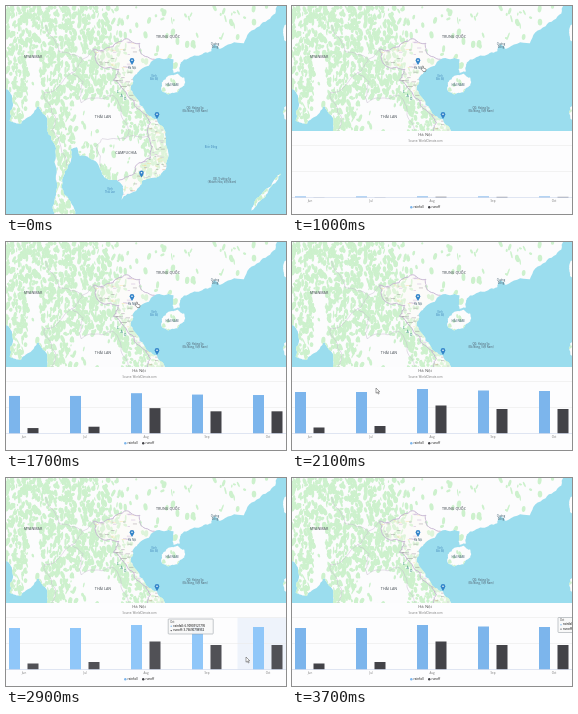
An HTML page with a canvas that plays this animation: 280x208 px, repeating every 3800 ms.

```html
<!DOCTYPE html>
<html lang="vi">
<head>
<meta charset="utf-8">
<title>Rainfall map</title>
<style>
html, body { margin: 0; width: 100%; height: 100%; overflow: hidden; background: #fff; }
canvas { display: block; width: 280px; height: 208px; }
</style>
</head>
<body>
<canvas id="stage"></canvas>
<script>
const W = 280, H = 208, LOOP = 3800;
const dpr = window.devicePixelRatio || 1;
const SANS = '"Open Sans", "Noto Sans", sans-serif';

function prepare(canvas) {
  canvas.width = W * dpr;
  canvas.height = H * dpr;
  const g = canvas.getContext('2d');
  g.scale(dpr, dpr);
  return g;
}

let seed = 7;
const rnd = () => (seed = (seed * 16807) % 2147483647) / 2147483647;
const clamp = v => Math.min(1, Math.max(0, v));

// Mercator projection with Hà Nội as the anchor.
const mercator = lat => Math.log(Math.tan(Math.PI / 4 + lat * Math.PI / 360));
const project = (lon, lat) =>
  [126 + 10.5 * (lon - 105.85), 58.5 + 601.6 * (mercator(21.03) - mercator(lat))];

// Repeated midpoint displacement turns a few points into a natural line.
function rough(list, amount = .3, depth = 3) {
  if (!depth) return list;
  const out = [list[0]];
  for (let i = 1; i < list.length; i++) {
    const [ax, ay] = list[i - 1], [bx, by] = list[i];
    const k = (rnd() - .5) * amount;
    out.push([(ax + bx) / 2 + (by - ay) * k, (ay + by) / 2 - (bx - ax) * k], list[i]);
  }
  return rough(out, amount, depth - 1);
}

const line = s => rough(s.split(' ').map(p => project(...p.split(',').map(Number))));

function trace(list) {
  const path = new Path2D();
  list.forEach(p => path.lineTo(...p));
  return path;
}

function island(x, y, rx, ry, turn = 0) {
  const ring = Array.from({ length: 9 }, (_, i) => {
    const a = i * Math.PI / 4, u = rx * Math.cos(a), v = ry * Math.sin(a);
    return [x + u * Math.cos(turn) - v * Math.sin(turn), y + u * Math.sin(turn) + v * Math.cos(turn)];
  });
  return trace(rough(ring));
}

function text(g, str, x, y, size, color = '#555', weight = 400, align = 'center') {
  g.font = `${weight} ${size}px ${SANS}`;
  g.fillStyle = color;
  g.textAlign = align;
  g.textBaseline = 'middle';
  g.fillText(str, x, y);
}

function dot(g, x, y, r, color) {
  g.beginPath();
  g.arc(x, y, r, 0, 7);
  g.fillStyle = color;
  g.fill();
}

// Coasts and borders as longitude,latitude.
const westCoast = line('93,19.5 94,18.8 94.5,17.6 94.2,16 95.3,15.7 96.3,16.5 96.9,17.3 97.6,16.4 97.8,15 98.6,12.8 98.7,10.2 98.3,8 98.5,6.5 100.6,6.5 100,8.4 99.3,9.3 99.2,10.5 99.9,12 100,13.3 100.6,13.5 100.9,12.7 102.2,12.3 103,11 103.6,10.5 104.5,10.4');
const vietCoast = line('104.5,10.4 105,9.9 104.8,8.6 106.2,9.4 106.8,10.4 108,10.7 109,11.4 109.3,13 108.9,15.2 108.2,16.1 107,17 105.7,18.8 105.9,19.8 106.7,20.6 108,21.5');
const eastCoast = line('108,21.5 109.8,21.5 109.8,20.3 110.4,20.4 110.5,21.2 112,21.8 113.4,22.2 113.6,22.8 114.2,22.4 116.5,22.9 118,24.4 119.5,25.5 120,27');
const vietBorder = line('108,21.5 106.7,22 106.6,22.9 105.3,23.3 104,22.6 102.2,22.4 103,20.8 104.6,20.6 104.1,19.6 105.1,18.7 106.5,17 107.6,15.8 107.4,14.5 107.6,12.5 106.2,11.8 106,11 104.5,10.4');
const borders = [
  '100.1,20.3 101.2,19.5 101,17.6 102.2,18 104,18.3 104.8,16.5 105.6,15 105.2,14.3 103,14.3 102.4,13.6 102.9,11.7',
  '97.6,24.5 98.9,22.2 101.1,21.5 100.1,20.3 97.5,18.5 98.6,16.2 98.2,15.1 99.6,11.8',
  '105.2,14.3 107.4,14.5',
  '101.1,21.5 102.2,22.4'
].map(line);

const inside = (x, y, cx, cy, rx, ry) => ((x - cx) / rx) ** 2 + ((y - cy) / ry) ** 2 < 1;

// Chance of forest: dense in the west, thin in the north-east, rare on the plains.
function forest(x, y) {
  const plain = inside(x, y, 90, 115, 27, 24) || inside(x, y, 116, 150, 23, 17) ||
    inside(x, y, 28, 82, 7, 36) || inside(x, y, 122, 184, 18, 14);
  if (plain) return .05;
  return y > 85 ? .8 : .1 + .75 * clamp((135 - x - (70 - y) * .3) / 45);
}

function pin(g, x, y) {
  g.beginPath();
  g.moveTo(x, y + 4);
  g.quadraticCurveTo(x - 2.3, y + 1, x - 2.3, y - .8);
  g.arc(x, y - .8, 2.3, Math.PI, 0);
  g.quadraticCurveTo(x + 2.3, y + 1, x, y + 4);
  g.fillStyle = '#3384c9';
  g.fill();
  dot(g, x, y - .8, .8, '#fff');
}

function drawMap(g) {
  g.fillStyle = '#9bddee';
  g.fillRect(0, 0, W, H);
  const land = trace([[-9, -9], ...westCoast, ...vietCoast, ...eastCoast]);
  land.addPath(island(167, 78, 13, 9.5, -.5));
  land.addPath(island(260, 186, 24, 2, -.89));
  land.addPath(island(281, 27, 4, 10));
  land.addPath(island(281, 107, 4, 8));
  g.fillStyle = '#fcfcfd';
  g.fill(land);

  g.save();
  g.clip(land);
  g.fillStyle = '#cdf1cd';
  for (let i = 0; i < 6000; i++) {
    const x = rnd() * W, y = rnd() * H;
    if (rnd() > forest(x, y)) continue;
    g.beginPath();
    g.ellipse(x, y, .6 + rnd() * 1.8, 1 + rnd() * 3, rnd() - .5, 0, 7);
    g.fill();
  }
  g.restore();

  g.lineWidth = .5;
  g.strokeStyle = '#c6bccf';
  borders.forEach(b => g.stroke(trace(b)));

  // Small town names and province lines.
  g.save();
  g.clip(trace([...vietCoast, ...vietBorder]));
  g.fillStyle = 'rgba(252,248,240,.35)';
  g.fillRect(85, 30, 85, 170);
  for (let i = 0; i < 420; i++) {
    g.fillStyle = ['rgba(110,100,110,.4)', 'rgba(190,160,205,.5)', 'rgba(248,220,150,.5)'][i % 3];
    g.fillRect(85 + rnd() * 80, 34 + rnd() * 160, 1.5 + rnd() * 3, .8);
  }
  g.restore();
  g.lineWidth = .9;
  g.strokeStyle = '#c4b3d2';
  g.stroke(trace(vietBorder));

  const label = (s, x, y, size = 2.6, color = '#5f7887') =>
    s.split('|').forEach((row, i) => text(g, row, x, y + i * 3.1, size, color, 600));
  const country = (s, x, y) => label(s, x, y, 3.6, '#666c72');
  const sea = (s, x, y) => label(s, x, y, 2.5, '#5598c4');
  country('MYANMAR', 27, 51);
  country('TRUNG QUỐC', 162, 31.5);
  country('THÁI LAN', 97, 111);
  country('CAMPUCHIA', 120, 147.5);
  label('HẢI NAM', 166, 79, 3);
  label('Quảng|Đông', 209, 38);
  label('Hà Nội', 126, 62);
  label('QĐ. Hoàng Sa|(Đà Nẵng, Việt Nam)', 189, 102.5);
  label('QĐ. Trường Sa|(Khánh Hòa, Việt Nam)', 216, 173);
  sea('Vịnh|Bắc Bộ', 148, 70);
  sea('Vịnh|Thái Lan', 104, 183);
  sea('Biển Đông', 205, 141);
  [...'LÀO'].forEach((c, i) => label(c, 112 + i * 3.5, 86.5 + i * 3.5, 3.4, '#4a9a88'));
  pin(g, 126, 55);
  pin(g, 151, 109);
  pin(g, 135.5, 167.5);
}

const mapLayer = document.createElement('canvas');
drawMap(prepare(mapLayer));
const ctx = prepare(document.getElementById('stage'));

// Linear interpolation through rows of [time, x, y].
function follow(rows, t) {
  const i = rows.findIndex(r => r[0] > t);
  if (i < 0) return rows[rows.length - 1].slice(1);
  if (i === 0) return rows[0].slice(1);
  const [ta, ax, ay] = rows[i - 1], [tb, bx, by] = rows[i];
  const k = (t - ta) / (tb - ta);
  return [ax + (bx - ax) * k, ay + (by - ay) * k];
}

const cursorPath = [
  [0, 275, 212], [600, 130, 60], [1850, 130, 60], [2100, 84, 146],
  [2400, 84, 156], [2900, 240, 179], [3200, 243, 180], [3500, 300, 178]
];
const tipPath = [[2400, 88, 141], [2650, 100, 141], [2900, 162, 141], [3400, 266, 139.5]];
const months = ['Jun', 'Jul', 'Aug', 'Sep', 'Oct'];
const rain = [41.5, 41.5, 44.5, 43, 42.5];
const runoff = [6, 7.5, 28, 24.5, 24.5];
const BASE = 191.5, STEP = 61;

function drawChart(t, mouseX) {
  ctx.fillStyle = '#fdfdfe';
  ctx.fillRect(0, 125, W, H - 125);
  text(ctx, 'Hà Nội', 133, 129, 4.3, '#555');
  text(ctx, 'Source: WorldClimate.com', 133.5, 134.8, 2.75, '#777');

  const hover = t < 2400 ? -1 : Math.floor((mouseX + 12.5) / STEP);
  const lit = hover >= 0 && hover < 5;
  if (lit) {
    ctx.fillStyle = '#eef3fb';
    ctx.fillRect(hover * STEP - 12.5, 139.5, STEP, BASE - 139.5);
  }
  ctx.fillStyle = '#ebebec';
  ctx.fillRect(0, 139, W, .6);
  ctx.fillRect(0, 165, W, .6);

  const grow = (1 - Math.cos(Math.PI * clamp((t - 900) / 1000))) / 2;
  const bar = (x, h, color) => {
    ctx.fillStyle = color;
    ctx.fillRect(x, BASE - h * grow, 11, h * grow);
  };
  months.forEach((m, i) => {
    const x = i * STEP;
    bar(x + 3, rain[i], lit ? '#90c7f9' : '#7cb5ec');
    bar(x + 21.5, runoff[i], lit ? '#515156' : '#434348');
    text(ctx, m, x + 18, 194.8, 2.9, '#777');
  });
  ctx.fillStyle = '#ccd6eb';
  ctx.fillRect(0, 191, W, .6);

  dot(ctx, 119.3, 201.3, 1.2, '#7cb5ec');
  text(ctx, 'rainfall', 121.6, 201.2, 2.9, '#444', 600, 'left');
  dot(ctx, 137.2, 201.3, 1.2, '#434348');
  text(ctx, 'runoff', 139.4, 201.2, 2.9, '#444', 600, 'left');
  if (t >= 2400) drawTip(months[Math.min(4, hover)], ...follow(tipPath, t));
}

function drawTip(month, x, y) {
  ctx.fillStyle = 'rgba(249,249,249,.93)';
  ctx.strokeStyle = '#8a9299';
  ctx.lineWidth = .5;
  ctx.beginPath();
  ctx.roundRect(x, y, 45, 15, .7);
  ctx.fill();
  ctx.stroke();
  text(ctx, month, x + 2, y + 3, 2.6, '#333', 400, 'left');
  dot(ctx, x + 3, y + 7.3, .7, '#7cb5ec');
  text(ctx, 'rainfall: 6.90909121795', x + 5, y + 7.2, 2.9, '#333', 600, 'left');
  dot(ctx, x + 3, y + 11.6, .7, '#434348');
  text(ctx, 'runoff: 3.76690798932', x + 5, y + 11.5, 2.9, '#333', 600, 'left');
}

const arrow = new Path2D('M0 0V5.2L1.3 4.1 2.2 6 3.1 5.6 2.2 3.8H3.8Z');
const hand = new Path2D('M.8 0Q1.5 0 1.5 .8V2.2L3.8 2.8Q4.2 3 4 4L3.5 5.5H1.1L-.6 3.3Q-.4 2.5 .1 3V.8Q.1 0 .8 0Z');

function drawCursor(t, x, y) {
  const shape = t >= 550 && t < 1900 ? hand : arrow;
  ctx.save();
  ctx.translate(x, y);
  ctx.fillStyle = '#fff';
  ctx.strokeStyle = '#444';
  ctx.lineWidth = .5;
  ctx.fill(shape);
  ctx.stroke(shape);
  ctx.restore();
}

function draw(t) {
  ctx.drawImage(mapLayer, 0, 0, W, H);
  const [x, y] = follow(cursorPath, t);
  if (t >= 1000) drawChart(t, x);
  drawCursor(t, x, y);
}

const start = performance.now();
function tick() {
  draw((performance.now() - start) % LOOP);
  requestAnimationFrame(tick);
}
tick();
</script>
</body>
</html>
```
